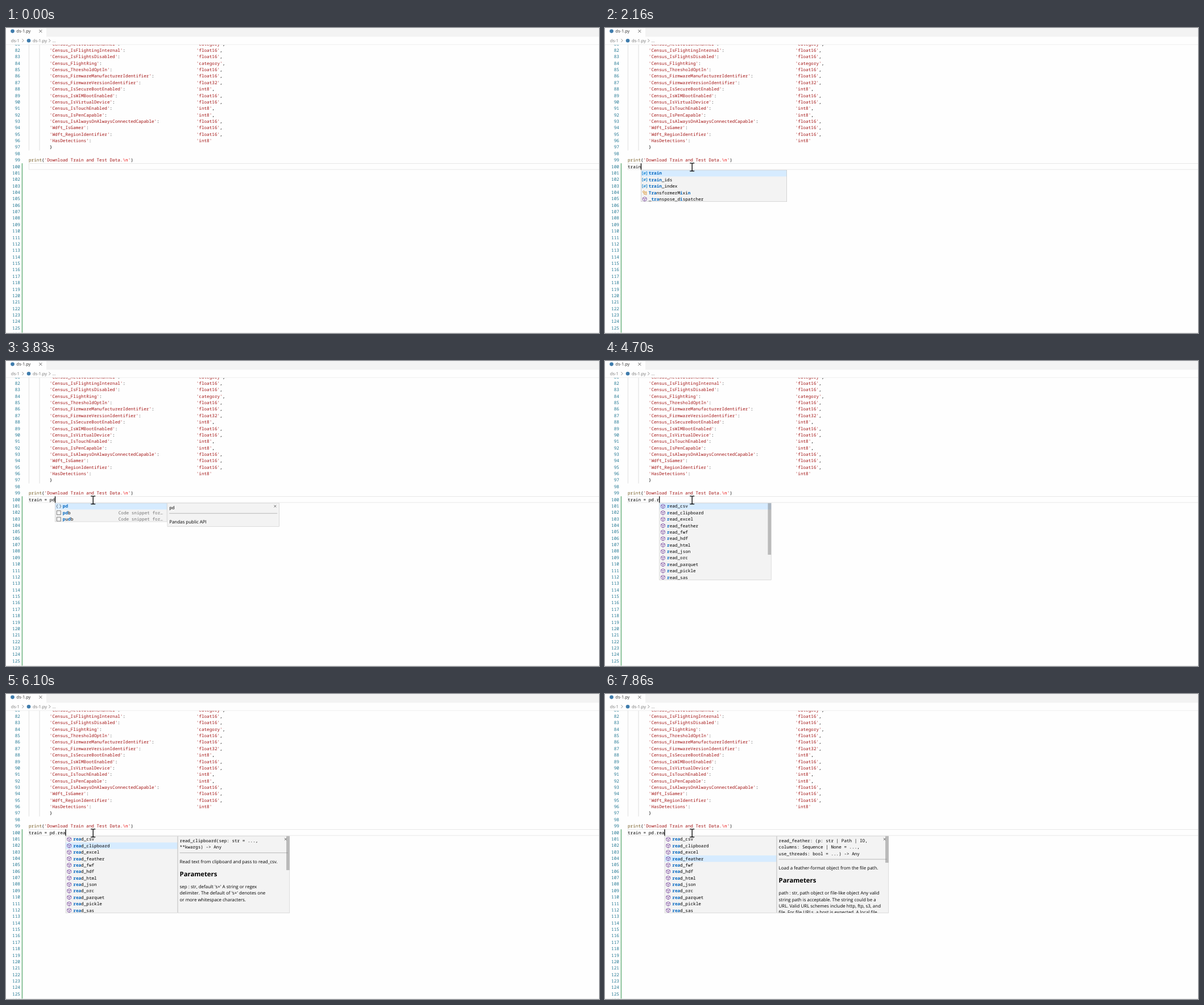
Write an HTML page that moves like this. It is 1043 px wide and 537 px high and loops after 8000 ms.

```html
<!DOCTYPE html>
<html lang="en">
<head>
<meta charset="utf-8">
<title>Editor</title>
<style>
html, body { margin: 0; width: 100%; height: 100%; overflow: hidden; background: #fefefe; }
svg { display: block; }
text { white-space: pre; text-rendering: geometricPrecision; }
.mono { font-family: "Noto Sans Mono", "DejaVu Sans Mono", monospace; font-size: 7.675px; }
.sans { font-family: "Open Sans", "Noto Sans", sans-serif; font-size: 7.94px; }
.str { fill: #a31515; }
.fn { fill: #795e26; }
.esc { fill: #ee0000; }
.blue { fill: #0000ff; }
.num { fill: #237893; text-anchor: end; }
.hit { fill: #0066bf; font-weight: 700; }
.dim { fill: #757575; }
.head { font-size: 11.3px; font-weight: 700; }
.line { fill: none; stroke-width: .8; }
</style>
</head>
<body>
<svg id="stage" width="1043" height="537" viewBox="0 0 1043 537">
  <defs><clipPath id="editor"><rect y="29" width="1043" height="508"/></clipPath></defs>
  <rect width="1043" height="537" fill="#fefefe"/>
  <g id="page"></g>
  <g id="popup"></g>
  <text id="typed" class="mono" x="40"></text>
  <rect id="caret" y="238.3" width="1.3" height="11.2"/>
  <path id="mouse" fill="none" stroke="#000" stroke-width="1.3"
    d="M-4-7h2.6q1.4 0 1.4 1.2q0-1.2 1.4-1.2h2.6M0-6V6M-4 7h2.6q1.4 0 1.4-1.2q0 1.2 1.4 1.2h2.6"/>
</svg>
<script>
const CH = 4.605, ROW = 11.365, LEFT = 40, TOP = 249.7, LOOP = 8000;
const $ = id => document.getElementById(id);
const lineY = n => 42 + (n - 82) * ROW;
const text = (x, y, cls, s) => `<text x="${x}" y="${y}" class="${cls}">${s}</text>`;
const span = (cls, s) => `<tspan class="${cls}">${s}</tspan>`;
const rect = (x, y, w, h, fill, more = '') =>
  `<rect x="${x}" y="${y}" width="${w}" height="${h}" fill="${fill}" ${more}/>`;
const stroke = (d, color, more = '') => `<path class="line" d="${d}" stroke="${color}" ${more}/>`;
const cross = (x, y, r) => stroke(`M${x - r} ${y - r}l${2 * r} ${2 * r}m0 ${-2 * r}l${-2 * r} ${2 * r}`, '#444');

// The dictionary on screen, first entry is line 81
const fields = `ActivationChannel category,IsFlightingInternal float16,IsFlightsDisabled float16,
FlightRing category,ThresholdOptIn float16,FirmwareManufacturerIdentifier float16,
FirmwareVersionIdentifier float32,IsSecureBootEnabled int8,IsWIMBootEnabled float16,
IsVirtualDevice float16,IsTouchEnabled int8,IsPenCapable int8,
IsAlwaysOnAlwaysConnectedCapable float16,Wdft_IsGamer float16,
Wdft_RegionIdentifier float16,HasDetections int8`.split(/,\s*/).map(s => s.split(' '));

function drawPage() {
  let s = '';
  s += stroke('M40.4 29V215.5M59 29V215.5', '#d6d6d6');
  fields.forEach(([key, type], i) => {
    const name = /^(Wdft|Has)/.test(key) ? key : 'Census_' + key;
    const y = lineY(81 + i), end = i < fields.length - 1 ? ',' : '';
    s += text(LEFT + 8 * CH, y, 'mono', span('str', `'${name}'`) + ':');
    s += text(LEFT + 64 * CH, y, 'mono', span('str', `'${type}'`) + end);
  });
  s += text(LEFT + 8 * CH, lineY(97), 'mono', '}');
  s += text(LEFT, lineY(99), 'mono', span('fn', 'print') + '(' +
    span('str', "'Download Train and Test Data.") + span('esc', '\\n') + span('str', "'") + ')');
  for (let n = 81; n <= 126; n++) s += text(24.9, lineY(n), 'mono num', n);
  s += rect(40.3, 238.5, 1010, 10.6, 'none', 'stroke="#e8e8e8"');
  s += rect(27.6, 238.2, 1.7, 300, '#79b98a');

  let top = rect(71, 0, 972, 15.4, '#f3f3f3');
  top += '<g style="font-size:7.5px">';
  const label = (x, y, fill, t) =>
    `<text x="${x}" y="${y}" class="sans" style="font-size:7.5px" fill="${fill}">${t}</text>`;
  top += label(18.3, 8.4, '#333', 'ds-1.py') + label(8.8, 25, '#757575', 'ds-1') +
    label(47, 25, '#757575', 'ds-1.py') + label(81.5, 25, '#757575', '...') + '</g>';
  top += '<circle cx="11.5" cy="5.6" r="3.3" fill="#3f7cac"/><circle cx="40" cy="22.2" r="3.3" fill="#3f7cac"/>';
  top += cross(60.8, 5.6, 2.5);
  top += stroke('M28.4 19.4l2.6 2.8-2.6 2.8M75.4 19.4l2.6 2.8-2.6 2.8', '#757575');
  top += stroke('M0 29.2H1043', '#ececec') + stroke('M0 536.6H1043', '#e8e8e8');
  return `<g clip-path="url(#editor)">${s}</g>${top}`;
}

const icons = {
  v: stroke('M-2.6-2.8h-1.4v5.6h1.4M2.6-2.8h1.4v5.6h-1.4M-1.8 2l3.6-4', '#007acc') +
     '<circle r="1.5" class="line" stroke="#007acc"/>',
  c: stroke('M-3.6-1.4l2-2 1.6 1.6-2 2zM-1 .2V2.6H1M-.2-.6H1M1.2-.6l1.2-1.2 1.3 1.2-1.3 1.2zM1.2 2.6l1.2-1.2 1.3 1.2-1.3 1.2z', '#d67e00'),
  m: stroke('M0-3.7L3.4-2V1.9L0 3.8-3.4 1.9V-2zM-3.4-2L0-.3 3.4-2M0-.3V3.8', '#7a48a0'),
  k: stroke('M-4-2.6h3M.6-2.6H4M-4-.9h5M2.2-.9H4M-4 .9h2.6M0 .9h4M-4 2.6h5', '#4c6a80'),
  n: stroke('M-1.6-3q-1.3 0-1.3 1.3T-4 0q1.1 0 1.1 1.6T-1.6 3M1.6-3q1.3 0 1.3 1.3T4 0q-1.1 0-1.1 1.6T1.6 3', '#55606a'),
  s: stroke('M-3.5-3.5h7v7h-7z', '#616161')
};

// Each entry is an icon letter, a colon and a label
const readers = 'csv clipboard excel feather fwf hdf html json orc parquet pickle sas';
const tra = 'v:train v:train_ids v:train_index c:TransformerMixin m:_transpose_dispatcher ' +
  'c:StratifiedKFold c:TemporaryDirectory v:tracebacklimit m:train_test_split c:TracebackException m:transpose_inplace';
const lists = {
  t: ['k:try v:test v:test_ids v:test_index v:train v:train_ids v:train_index c:tuple c:type m:take m:take_along_axis m:tcgetpgrp', 257, 23.5],
  tr: ['k:try ' + tra, 257, 60],
  tra: [tra, 257],
  train: [tra.split(' ').slice(0, 5).join(' '), 257],
  pd: ['n:pd s:pdb s:pudb', 197.4],
  dot: ['n:api m:array n:arrays m:bdate_range c:BooleanDtype c:Categorical c:CategoricalDtype c:CategoricalIndex n:compat m:concat n:core m:crosstab', 197.4, 13],
  read: [readers.split(' ').map(r => 'm:read_' + r).join(' '), 197.4, 91]
};

// ~ marks keywords, ^ marks literals
const docs = {
  pd: { code: ['pd'], note: 'Pandas public API', h: 42 },
  api: { code: ['api'], note: 'public toolkit API', h: 42 },
  csv: { bar: 12, code: ['read_csv(reader: IO, sep: str = ...,', 'delimiter: str | None = ..., header: int',
    "| List[int] | Literal[^'infer'^] = ...,", 'names: Sequence[str] | None = ...,',
    'index_col: int | str | Sequence |', 'Literal[~False~] | None = ..., usecols: int',
    '| str | Sequence | None = ..., squeeze:', 'bool = ..., prefix: str | None = ...,',
    'mangle_dupe_cols: bool = ..., dtype: str', '| Dict[str, Any] | None = ..., engine:',
    "Literal[^'c'^, ^'python'^] | None = ...,", 'converters: Dict[int | str, (*args,'] },
  clipboard: { bar: 60, code: ['read_clipboard(sep: str = ...,', '**kwargs) -> Any'],
    note: 'Read text from clipboard and pass to read_csv.',
    body: ["sep : str, default 's+' A string or regex", "delimiter. The default of 's+' denotes one", 'or more whitespace characters.'] },
  excel: { bar: 12, code: ['read_excel(filepath: str, sheet_name:', 'List[int | str] | ~None~, header: int |',
    'List[int] = ..., names: List[str] | None', '= ..., index_col: int | Sequence[int] |',
    'None = ..., usecols: int | str |', 'Sequence[int | str | (*args, **kwargs) ^->^',
    'Any] | None = ..., squeeze: bool = ...,', 'dtype: str | Dict[str, Any] = ...,',
    'engine: str | None = ..., converters:', 'Dict[int | str, (*args, **kwargs) ^->^ Any]',
    '| None = ..., true_values: List | None =', '..., false_values: List | None = ...,'] },
  feather: { bar: 47, code: ['read_feather: (p: str | Path | IO,', 'columns: Sequence | None = ...,', 'use_threads: bool = ...) -> Any'],
    note: 'Load a feather-format object from the file path.',
    body: ['path : str, path object or file-like object Any valid', 'string path is acceptable. The string could be a',
      'URL. Valid URL schemes include http, ftp, s3, and', 'file. For file URLs, a host is expected. A local file'] }
};

const panel = (x, w, h, inner) =>
  `<svg x="${x}" y="${TOP}" width="${w}" height="${h}">` + rect(0, 0, w, h, '#f3f3f3') + inner +
  rect(.35, .35, w - .7, h - .7, 'none', 'stroke="#c4c4c4" stroke-width=".7"') + '</svg>';
const slider = (x, y, w, h, a = .4) => rect(x, y, w, h, '#646464', `opacity="${a}"`);

// Highlight the letters of the query in order
function marked(label, query) {
  let q = 0;
  return [...label].map(c => c.toLowerCase() === query[q] ? (q++, span('hit', c)) : c).join('');
}

function drawList(x, key, sel, query, bars) {
  const [items, w, thumb] = lists[key], rows = items.split(' ').slice(0, 12);
  let s = rect(0, sel * ROW + .4, w, ROW, '#d6ebff');
  rows.forEach((row, i) => {
    const [icon, label] = row.split(':'), y = 6.1 + i * ROW;
    s += `<g transform="translate(6.7 ${y})">${icons[icon]}</g>`;
    s += text(13.8, y + 2.7, 'mono', marked(label, query));
    if (icon === 's') s += text(w - 85.7, y + 2.7, 'mono dim', 'Code snippet for…');
  });
  if (thumb && bars) s += slider(w - 6.2, .4, 5.9, thumb, bars);
  return panel(x, w, rows.length * ROW - .4, s);
}

function drawDoc(x, key, bars) {
  const d = docs[key], w = 197.4, h = d.h || 12 * ROW - .4;
  let s = '';
  d.code.forEach((line, i) => {
    const t = line.replace(/~(.+?)~/g, (_, a) => span('blue', a)).replace(/\^(.+?)\^/g, (_, a) => span('str', a));
    s += text(3.7, 11.3 + i * ROW, 'mono', t);
  });
  if (d.note) {
    const y = 7.2 + d.code.length * ROW;
    s += stroke(`M3.7 ${y}H${w - 3.7}`, '#a9a9a9');
    s += text(3.7, y + 18, 'sans', d.note);
    if (d.body) {
      s += text(3.7, y + 41, 'sans head', 'Parameters');
      d.body.forEach((line, i) => s += text(3.7, y + 62.2 + i * ROW, 'sans', line));
    }
  }
  s += cross(w - 7.5, 5.9, 1.9);
  if (d.bar) s += slider(w - 6.2, .4, 5.9, d.bar);
  if (key === 'csv' && bars) s += slider(1, h - 6.2, 141, 6, bars);
  return panel(x, w, h, s);
}

// time, typed text, list, selected row, doc, scrollbar opacity
const steps = [
  [0, ''], [1530, 't'], [1610, 't', 't', 0, '', .4], [1700, 'tr', 'tr', 0, '', .4],
  [1780, 'tra', 'tra', 0], [1850, 'trai'], [1920, 'trai', 'tra', 0],
  [2160, 'train', 'train', 0], [2650, 'train '], [2790, 'train ='], [2880, 'train = '],
  [3670, 'train = p'], [3750, 'train = pd'], [3830, 'train = pd', 'pd', 0, 'pd'],
  [4150, 'train = pd.'], [4240, 'train = pd.', 'dot', 0, '', .4], [4410, 'train = pd.', 'dot', 0, 'api', .4],
  [4700, 'train = pd.r', 'read', 0, '', .4], [4780, 'train = pd.re', 'read', 0, '', .4],
  [4860, 'train = pd.rea', 'read', 0, 'csv', .4], [5390, 'train = pd.rea', 'read', 0, 'csv', .36],
  [5640, 'train = pd.rea', 'read', 0, 'csv'], [5870, 'train = pd.rea', 'read', 1, 'csv'],
  [6020, 'train = pd.rea', 'read', 1, 'clipboard'], [6340, 'train = pd.rea', 'read', 2, 'clipboard'],
  [6510, 'train = pd.rea', 'read', 2, 'excel'], [7060, 'train = pd.rea', 'read', 3, 'feather']
];
const caretOn = [[660, 1220], [1530, 3360], [3670, 5390], [5870, 6420], [6890, 7370], [7780, LOOP]];

function mouseAt(t) {
  if (t < 70) return null;
  if (t < 660) {
    const p = Math.min(6, Math.floor((t - 70) / 75)) / 6, k = (1 - p) ** 2;
    return [155.5 + 414 * k, 245 + 146.5 * k];
  }
  if (t < 745) return [160, 241];
  if (t < 830) return [158, 247.5];
  return t < 1070 ? [155.3, 245.3] : [153.2, 244.8];
}

let shown = null;
function draw(t) {
  const step = steps.findLast(s => s[0] <= t);
  if (step !== shown) {
    shown = step;
    const [, typed, list, sel, doc, bars] = step;
    const x = LEFT + typed.length * CH;
    $('typed').textContent = typed;
    $('caret').setAttribute('x', x - .2);
    const query = typed.match(/\w*$/)[0];
    $('popup').innerHTML = (list ? drawList(x, list, sel, query, bars) : '') +
      (doc ? drawDoc(x + 197.4, doc, bars) : '');
  }
  $('caret').style.display = caretOn.some(([a, b]) => t >= a && t < b) ? '' : 'none';
  const m = mouseAt(t);
  $('mouse').style.display = m ? '' : 'none';
  if (m) $('mouse').setAttribute('transform', `translate(${m[0]} ${m[1]})`);
}

$('page').innerHTML = drawPage();
$('typed').setAttribute('y', lineY(100));
const start = performance.now();
function tick() {
  draw((performance.now() - start) % LOOP);
  requestAnimationFrame(tick);
}
tick();
</script>
</body>
</html>
```
